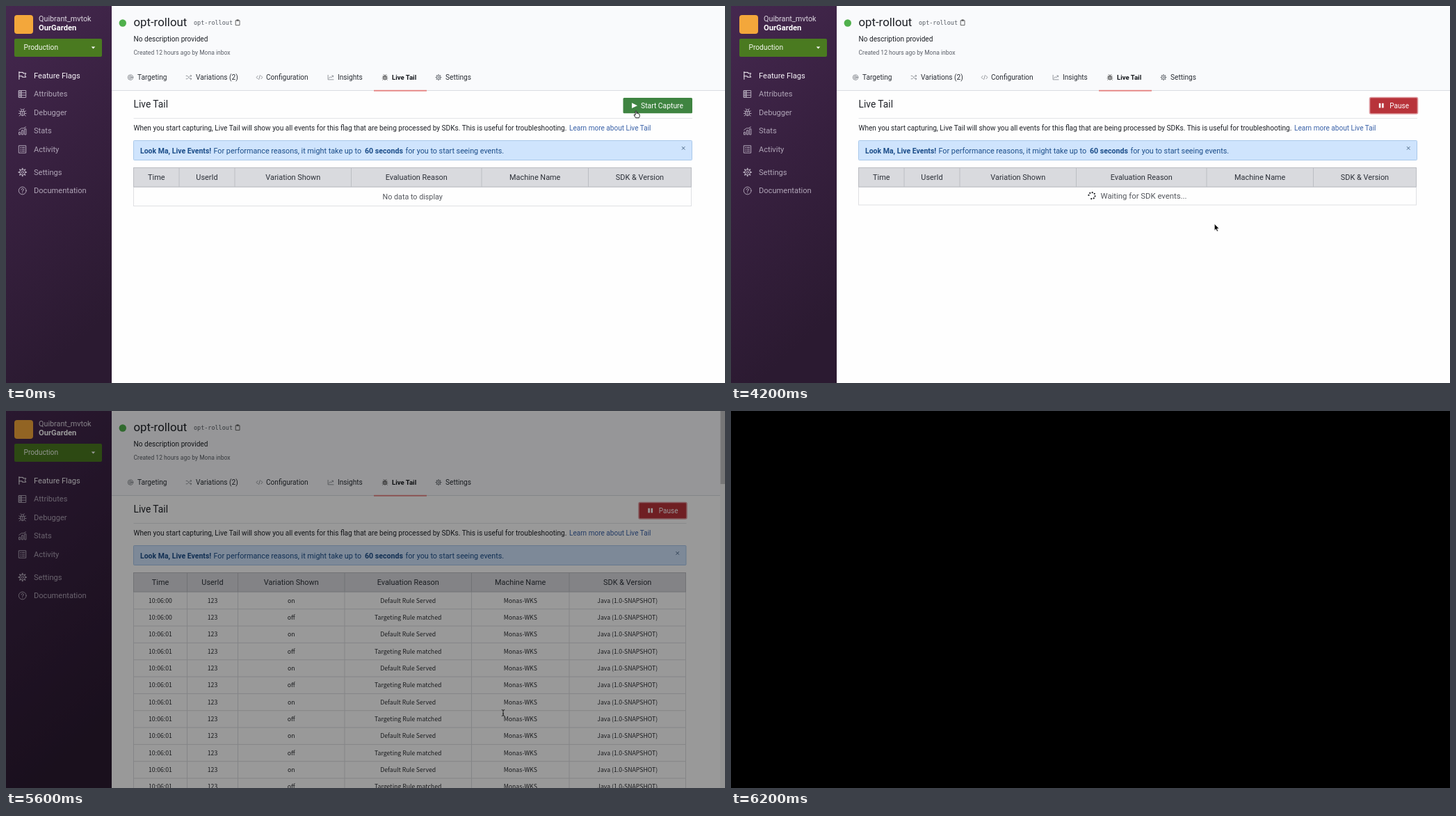
Write an HTML page that moves like this. It is 1034 px wide and 542 px high and loops after 6400 ms.

```html
<!DOCTYPE html>
<html lang="en">
<head>
<meta charset="utf-8">
<title>Live Tail</title>
<style>
  html, body { margin: 0; width: 100%; height: 100%; overflow: hidden; background: #fefefe; }
  svg { display: block; width: 100vw; height: 100vh; font-family: Roboto, "Open Sans", sans-serif; }
  .mono { font-family: "DejaVu Sans Mono", monospace; }
  .cell { font-family: "Noto Sans CJK SC", "Noto Sans CJK JP", "Noto Sans CJK", "Noto Sans", sans-serif; }
  .icon { fill: none; stroke-width: 1; stroke-linejoin: round; stroke-linecap: round; }
</style>
</head>
<body>
<svg id="stage" viewBox="0 0 1034 542" preserveAspectRatio="none"></svg>
<script>
const stage = document.getElementById('stage');
const LOOP = 6400, STEP = 200;
const CAPTURE = 800, EVENTS = 4400, FADE = 5200;

const rect = (x, y, w, h, fill, more = '') =>
  `<rect x="${x}" y="${y}" width="${w}" height="${h}" fill="${fill}" ${more}/>`;
const path = (d, more = '') => `<path d="${d}" ${more}/>`;
const line = (d, color, width = 1) => path(d, `fill="none" stroke="${color}" stroke-width="${width}"`);

// y is the middle of the capital letters
const text = (s, x, y, size, fill, more = '') =>
  `<text x="${x}" y="${(y + size * 0.355).toFixed(2)}" font-size="${size}" fill="${fill}" ${more}>${s}</text>`;
const centered = (s, x, y, size, fill, more = '') => text(s, x, y, size, fill, 'text-anchor="middle" ' + more);

// Icons are drawn around 0,0 in a 12 unit box
const gearTeeth = [...Array(8)].map((_, i) =>
  `<path d="M0-4V-5.4" transform="rotate(${i * 45})" stroke-width="1.8"/>`).join('');
const bug = path('M-2.6-1.5H2.6V2Q2.6 4.8 0 4.8T-2.6 2ZM-2-1.7Q-2-4.4 0-4.4T2-1.7M0-1V4.6' +
  'M-2.6-.6L-4.8-2.2M2.6-.6L4.8-2.2M-2.6 1.5H-5.4M2.6 1.5H5.4M-2.4 3.2L-4.6 5M2.4 3.2L4.6 5M-1.5-4L-2.6-5.4M1.5-4L2.6-5.4');
const ICONS = {
  flag: path('M-4.8-5.4V5.4M-4.8-4.6H.8V-3.2H5L3.6-.4L5 2.2H-.4V.8H-4.8'),
  grid: path('M-5-5H5V5H-5ZM-1.8-5V5M-5-1.7H5M-5 1.7H5') + path('M-5-5H-1.8V5H-5Z', 'fill="currentColor" fill-opacity=".4"'),
  bug,
  bars: path('M-5.2 5.2V2H-3V5.2ZM-1.1 5.2V-.6H1.1V5.2ZM3 5.2V-2.6H5.2V5.2ZM-5-1L-1-3.8L1-3.4L4.8-5.4'),
  list: path('M-5-5.2H5V5.2H-5ZM-3-2.6H-2M-.6-2.6H3.2M-3 0H-2M-.6 0H3.2M-3 2.6H-2M-.6 2.6H3.2'),
  gear: '<circle r="4"/><circle r="1.6"/>' + gearTeeth,
  help: '<circle r="5.4"/>' + path('M-1.7-1.4Q-1.6-3 0-3T1.7-1.4Q1.7-.4 0 .4V1.2M0 2.8V3'),
  target: '<circle r="5.2"/><circle r="2.9"/><circle r=".7"/>',
  shuffle: path('M-5.4-3H-3L2.4 3H5M-5.4 3H-3L-1.5 1.4M1-1.4L2.4-3H5M3.7-4.6L5.4-3L3.7-1.4M3.7 1.4L5.4 3L3.7 4.6'),
  code: path('M-3.4-3L-6 0L-3.4 3M3.4-3L6 0L3.4 3M1.2-4.2L-1.2 4.2'),
  chart: path('M-5.4-4.5V4.5H5.6M-3.2 1.6L-.8-1.2L1 .6L4.6-3.2M2.4-3.4H4.8V-1'),
};
const icon = (name, x, y, color, scale = 1) =>
  `<g class="icon" transform="translate(${x} ${y}) scale(${scale})" stroke="${color}" color="${color}">${ICONS[name]}</g>`;

const MENU = [['flag', 'Feature Flags', 100], ['grid', 'Attributes', 126.5], ['bug', 'Debugger', 153],
  ['bars', 'Stats', 179.3], ['list', 'Activity', 206], ['gear', 'Settings', 239], ['help', 'Documentation', 265.5]];

function sidebar() {
  return rect(0, 0, 152, 542, 'url(#purple)') +
    rect(12, 13, 27, 27, '#f3a73b', 'rx="4"') +
    text('Quibrant_mvtok', 47, 18.5, 10.8, '#ded8e2') +
    text('OurGarden', 47, 31.3, 11.2, '#fff', 'font-weight="600"') +
    rect(12, 47, 126, 26, '#4a7a20', 'rx="2"') +
    text('Production', 25.5, 59.5, 10.2, '#f4f7ef') +
    path('M122.7 58.6H128.3L125.5 61.6Z', 'fill="#fff"') +
    MENU.map(([name, label, y], i) => {
      const color = i ? '#b0a5b7' : '#f6f3f8';
      return icon(name, 23.7, y, color) + text(label, 40, y, 11.1, color);
    }).join('');
}

const TABS = [['target', 179, 'Targeting', 189], ['shuffle', 263, 'Variations (2)', 273],
  ['code', 364.5, 'Configuration', 374], ['chart', 467, 'Insights', 477],
  ['bug', 545, 'Live Tail', 555], ['gear', 622, 'Settings', 632]];

function header(right) {
  return rect(152, 2, right - 152, 119, '#f9fafc') +
    line(`M152 121.5H${right}`, '#dadde2') +
    '<circle cx="167.8" cy="24.5" r="5.2" fill="#50b04c"/>' +
    text('opt-rollout', 183.5, 23.5, 16.8, '#1d2026') +
    text('opt-rollout', 270, 23.8, 8.46, '#555a62', 'class="mono"') +
    path('M330.2 20.8H336V27.6H330.2Z', 'fill="none" stroke="#555" stroke-width=".9"') +
    rect(331.6, 19.4, 3, 2.2, '#555') +
    text('No description provided', 183.5, 47.5, 10.1, '#1f2228') +
    text('Created 12 hours ago by Mona inbox', 183.5, 67, 8.55, '#5b5f68') +
    TABS.map(([name, ix, label, x]) => {
      const on = label === 'Live Tail';
      return icon(name, ix, 102.6, on ? '#333' : '#6d7178', 0.72) +
        text(label, x, 102.5, on ? 9.6 : 10.15, on ? '#15181d' : '#2b2f36', on ? 'font-weight="600"' : '');
    }).join('') +
    rect(529, 120.8, 76, 1.8, '#e5807f');
}

function button(right, capturing) {
  if (!capturing)
    return rect(right - 99.5, 132, 99.5, 22.3, '#3f8441', 'rx="1.5"') +
      path('M900 139.3L908 143.2L900 147.1Z', 'fill="#fff"') +
      text('Start Capture', 913, 143, 10.35, '#fff');
  const x = right - 67.5;
  return rect(x - 1, 131.5, 69, 23.5, '#b8333a', 'rx="2" stroke="#de9a9f" stroke-width="1.6"') +
    rect(x + 12.3, 139.8, 2.6, 6.6, '#fff') + rect(x + 16.5, 139.8, 2.6, 6.6, '#fff') +
    text('Pause', x + 27.8, 143, 10, '#fff');
}

function notes(right) {
  const bold = 'font-weight="700"', blue = '#1b4d89';
  return text('Live Tail', 183.5, 141, 13.8, '#1f2228') +
    line(`M183.5 161.5H${right}`, '#e3e5e8') +
    text('When you start capturing, Live Tail will show you all events for this flag that are being ' +
      'processed by SDKs. This is useful for troubleshooting.', 183.5, 175.6, 10.1, '#1f2228') +
    text('Learn more about Live Tail', 810, 175.6, 10.05, '#3a62a8') +
    rect(183.5, 193.5, right - 184, 28, '#cfe4fd', 'stroke="#a9c8ea" rx="1"') +
    text('Look Ma, Live Events!', 193, 208.2, 10.5, blue, bold) +
    text('For performance reasons, it might take up to', 298.5, 208.2, 10.8, blue) +
    text('60 seconds', 516, 208.2, 10.6, blue, bold) +
    text('for you to start seeing events.', 574.5, 208.2, 10.75, blue) +
    line(`M${right - 15} 202.2l4.4 4.4m0-4.4l-4.4 4.4`, '#4a6788');
}

const TITLES = ['Time', 'UserId', 'Variation Shown', 'Evaluation Reason', 'Machine Name', 'SDK &amp; Version'];
const EMPTY_COLS = [183.5, 249, 329, 496.5, 684, 837.5, 985.5];
const FULL_COLS = [183.5, 260.5, 333.5, 487, 669.5, 810, 977.5];
const ROW = 24.33;

function tableHead(cols) {
  const end = cols[6];
  return rect(183.5, 232.5, end - 183.5, 27.5, '#d9dade', 'stroke="#bcbec3"') +
    cols.slice(1, 6).map(x => line(`M${x} 233V260`, '#bcbec3')).join('') +
    TITLES.map((s, i) => centered(s, (cols[i] + cols[i + 1]) / 2, 246, 10.9, '#2c3038')).join('');
}

function spinner(x, y, t) {
  const turn = t * 0.18 - 252;
  const dots = [...Array(7)].map((_, i) =>
    `<circle cx="4.6" r="1.15" transform="rotate(${(i + 1) * 45})"/>`).join('');
  return `<g transform="translate(${x} ${y}) rotate(${turn})" fill="#26282c">${dots}</g>`;
}

function emptyTable(t, capturing) {
  return rect(183.5, 260.5, 802, capturing ? 25.5 : 27, '#fefefe', 'stroke="#dfe0e3"') + tableHead(EMPTY_COLS) +
    (capturing
      ? spinner(519, 272.6, t) + text('Waiting for SDK events...', 531.5, 273, 11.35, '#54575d')
      : centered('No data to display', 584.7, 274, 10.75, '#54575d'));
}

function fullTable() {
  let out = '';
  for (let i = 0; i < 12; i++) {
    const y = 272.7 + i * ROW, even = i % 2 === 0;
    const cells = [i < 2 ? '10:06:00' : '10:06:01', '123', even ? 'on' : 'off',
      even ? 'Default Rule Served' : 'Targeting Rule matched', 'Monas-WKS', 'Java (1.0-SNAPSHOT)'];
    out += line(`M183.5 ${(260.4 + (i + 1) * ROW).toFixed(2)}H977.5`, '#dcdde0') +
      cells.map((s, c) => centered(s, (FULL_COLS[c] + FULL_COLS[c + 1]) / 2, y, 8.74, '#2a2c30', 'class="cell"')).join('');
  }
  return out + FULL_COLS.map(x => line(`M${x} 260V542`, '#dcdde0')).join('') + tableHead(FULL_COLS);
}

// Pointer stops: time, x, y
const STOPS = [[0, 906, 151], [600, 906, 151], [1200, 918.5, 146], [1400, 918.5, 146], [2200, 680, 319],
  [3800, 680, 319], [5000, 739, 297], [5200, 739, 297], [5600, 715, 434]];
const POINTERS = {
  hand: path('M-.9 1Q-.9-.2 0-.2T.9 1V3.6Q2-.0 2.6 3.8Q3.8 3.2 4 4.4Q5.2 4 5.2 5.4V7.2Q5 8.6 4.2 9.8H-.4Q-1.4 8.4-3 5.6Q-2.4 4.4-.9 6Z',
    'fill="#fff" stroke="#111" stroke-width=".9" stroke-linejoin="round"'),
  arrow: path('M0 0V9.4L2.1 7.4L3.6 10.8L5.2 10.1L3.7 6.8H6.6Z', 'fill="#000" stroke="#fff" stroke-width=".6"'),
  beam: line('M-2.2-4.5Q0-4.5 0-3Q0-4.5 2.2-4.5M0-3.5V3.5M-2.2 4.5Q0 4.5 0 3Q0 4.5 2.2 4.5M-1 1.2H1', '#222', 0.9),
};

function pointer(t) {
  if (t > 5600) return '';
  const next = Math.max(1, STOPS.findIndex(s => s[0] >= t));
  const [a, b] = [STOPS[next - 1], STOPS[next]];
  const p = (t - a[0]) / (b[0] - a[0]), e = p * p * (3 - 2 * p);
  const kind = t <= 1400 ? 'hand' : t < EVENTS ? 'arrow' : 'beam';
  return `<g transform="translate(${a[1] + (b[1] - a[1]) * e} ${a[2] + (b[2] - a[2]) * e})">${POINTERS[kind]}</g>`;
}

const DEFS = '<defs><linearGradient id="purple" x1="0" y1="0" x2=".25" y2="1">' +
  '<stop offset="0" stop-color="#45284f"/><stop offset=".5" stop-color="#37203f"/>' +
  '<stop offset="1" stop-color="#2b1a31"/></linearGradient></defs>';

function scene(t) {
  const capturing = t >= CAPTURE, filled = t >= EVENTS;
  const right = filled ? 978.5 : 987;
  const dark = Math.min(1, Math.max(0, (t - FADE) / 1000));
  return DEFS + rect(0, 0, 1034, 542, '#fefefe') + sidebar() +
    header(filled ? 1027 : 1034) + notes(right) + button(right, capturing) +
    (filled ? fullTable() + rect(1027, 0, 7, 542, '#f5f5f5') + rect(1027.5, 0, 6.5, 105, '#c4c4c6')
      : emptyTable(t, capturing)) +
    pointer(t) + rect(0, 0, 1034, 542, '#000', `opacity="${dark}"`);
}

let shown = -1;
function tick() {
  const t = Math.floor(performance.now() % LOOP / STEP) * STEP;
  if (t !== shown) stage.innerHTML = scene(shown = t);
  requestAnimationFrame(tick);
}
tick();
</script>
</body>
</html>
```
